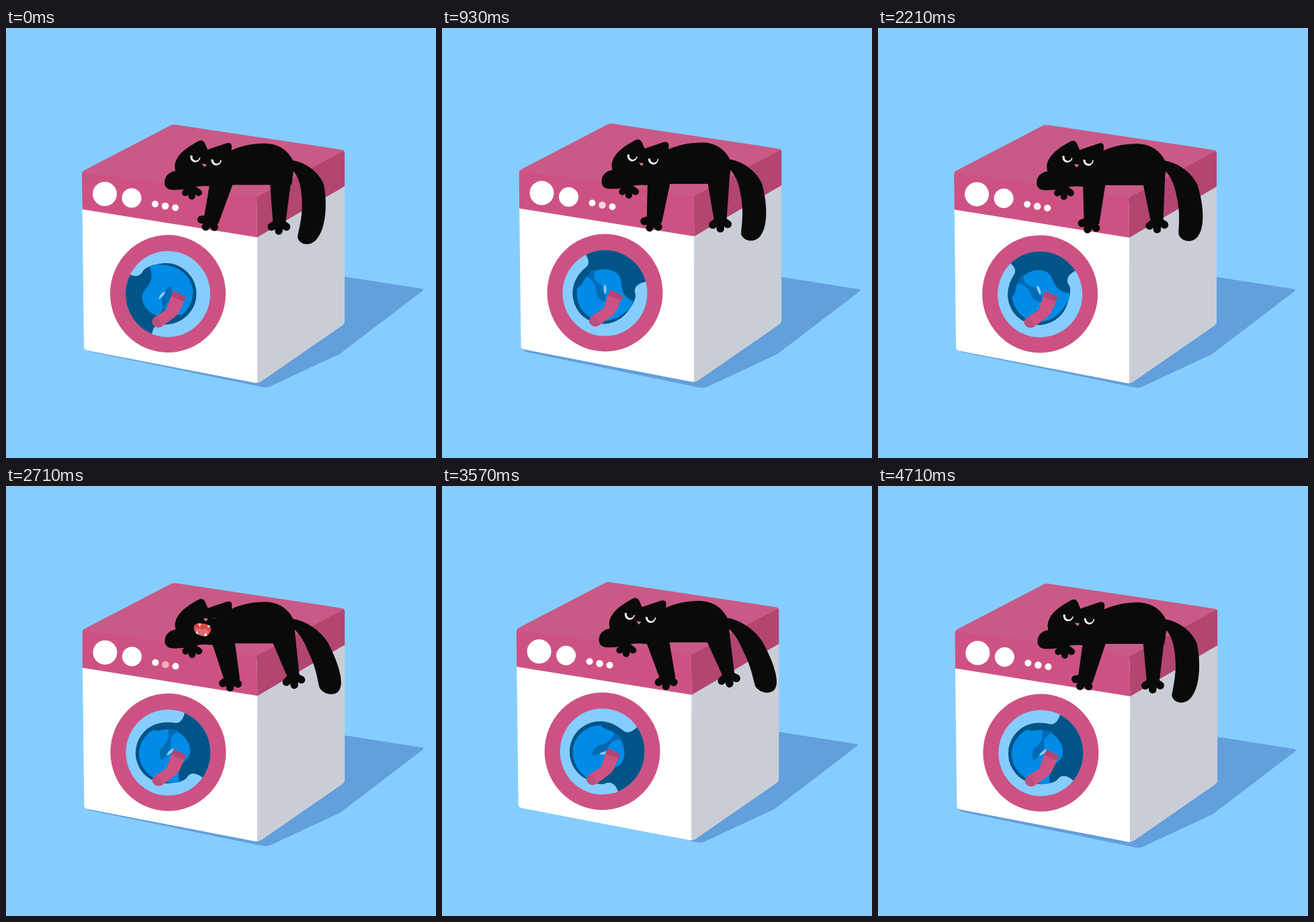
Recreate the animation shown at these times as an HTML page. Size 640x640 px, loop 4.78 s.

```html
<!DOCTYPE html>
<html lang="en">
<head>
<meta charset="utf-8">
<title>Cat on a washing machine</title>
<style>
  html, body { margin: 0; width: 100%; height: 100%; overflow: hidden; background: #85cdff; }
  svg { display: block; width: 100%; height: 100%; }
</style>
</head>
<body>
<svg viewBox="0 0 640 640">
  <defs>
    <clipPath id="box">
      <path d="M113 218Q113 213 118 211L243 146Q247 143 253 144L500 181Q504 182 504 187V436Q504 440 500 443L380 526Q375 529 370 528L121 480Q116 479 116 474Z"/>
    </clipPath>
    <clipPath id="glass"><ellipse cx="241" cy="396" rx="63" ry="64"/></clipPath>
    <g id="eye">
      <path d="M-7.7 0A7.7 8.6 0 0 0 7.7 0Z" fill="#fff"/>
      <circle cx=".8" cy=".6" r="5.3" fill="#0a0a0a"/>
    </g>
    <path id="paw" d="M-11.5 8L0 0L-.5 14M0 0L11 8" fill="none" stroke="#0a0a0a" stroke-width="11.500" stroke-linecap="round" stroke-linejoin="round"/>
  </defs>

  <rect width="640" height="640" fill="#85cdff"/>
  <path id="shadow" fill="#629fdc" d="M118 478L300 340L504 370L619 388Q623 389.500 619 392L497 485L396 532Q390 536 382 534.500L124 481.500Z"/>

  <g id="machine">
    <g clip-path="url(#box)">
      <path fill="#fff" d="M100 260H374V540H100Z"/>
      <path fill="#c9ced6" d="M374 305L520 220V450L374 535Z"/>
      <path fill="#c95a87" d="M108 212L248 138L510 183L373 254Z"/>
      <path fill="#cd5283" d="M108 212L373 252L374 311.500L108 269Z"/>
      <path fill="#b34571" d="M373 252L510 179V232L374 311.500Z"/>
    </g>
    <g fill="#fff">
      <circle cx="147" cy="247" r="18"/>
      <circle cx="187" cy="253" r="14.500"/>
      <circle cx="222" cy="262" r="5"/>
      <circle id="lamp" cx="237" cy="265" r="5.300"/>
      <circle cx="252" cy="267.500" r="5"/>
    </g>

    <ellipse cx="241" cy="395.500" rx="86" ry="87.500" fill="#cd5283"/>
    <g clip-path="url(#glass)">
      <rect x="170" y="325" width="142" height="142" fill="#85cdff"/>
      <g id="drum">
        <path fill="#005487" d="M34 -66C30 -46 23 -42 17 -43C9 -45 3 -45 -1 -45A45 45 0 0 0 1 46C15 46 25 44 29 38C35 31 45 33 56 46H85V-66Z"/>
        <path fill="#008be6" d="M-17 -35C-9 -31 1 -36 7 -34C21 -32 36 -18 36 -2C36 8 29 12 23 18C15 26 15 36 17 44L5 46C-3 43 -13 42 -21 36C-33 29 -41 14 -40.500 0C-40 -14 -31 -28 -17 -35Z"/>
        <path fill="#006ab3" d="M5 -34Q21 -34 20 -30C9 -26 6 -18 8 -10C7 0 -3 8 -8 11C-13 -1 -7 -8 -1 -12C5 -18 7 -26 5 -34Z"/>
        <path fill="#85cdff" d="M0 4Q3 -3 12 -6Q11 0 4 3Z"/>
      </g>
    </g>
    <path fill="#cd5283" d="M246 398L265 407L257 424Q254 428 250 431L231 445Q222 448 218 440Q216 434 222 430L239 419Z"/>
    <path fill="#b34571" d="M249.500 391L268 400L264.500 407L245.500 399Z"/>
    <path fill="#b9507c" d="M222 430Q231 433 232 444Q222 448 218 440Q216 434 222 430Z"/>

    <g fill="#0a0a0a">
      <path id="tail"/>
      <path id="hind"/>
      <use id="hindPaw" href="#paw"/>
      <g id="fore">
        <path d="M303 233L306 215H340L337 234L316 291Q303 298 294.500 283Z"/>
        <use href="#paw" transform="translate(304.500 284) rotate(30)"/>
      </g>
      <path d="M251 206C252 188 272 176 287 168Q294 165 297 174L300 181L328 171.500Q336 169 336 177L335.500 182C350 175 372 171 390 172C408 174 420 183 427 197L428 212L425 233.500H330Q308 237 296 235L284 236L262 240.500L250 241C242 241 236 238 236 230C236 220 243 214 252 213Z"/>
      <use href="#paw" transform="translate(277 238) scale(.88)"/>
    </g>
    <use id="eyeL" href="#eye"/>
    <use id="eyeR" href="#eye"/>
    <path id="lids" d="M275 190L290 193M304 194.500L320 196" fill="none" stroke="#fff" stroke-width=".8" stroke-dasharray="2 3" opacity=".7"/>
    <path id="nose" fill="#e0777f" d="M291.500 202L299 203L295.500 207Z"/>
    <g id="mouth">
      <path fill="#dc4846" d="M-13 -3Q-11 -11 -2 -9Q10 -10 13 -1Q12 9 3 10Q-12 9 -13 -3Z"/>
      <path fill="#dc6c78" d="M-12 0Q-5 -4 0 0Q6 -3 9 2Q9 8 3 9Q-10 8 -12 0Z"/>
      <path fill="#fff" d="M-6 -9L-2 -9L-4 -4ZM8 -7L12 -5L8 -3ZM-10 5L-8 2L-6 7ZM2 10L5 5L7 9Z"/>
    </g>
  </g>
</svg>
<script>
const LOOP = 4780, FRAMES = 67, STEP = LOOP / FRAMES;
const $ = id => document.getElementById(id);
const set = (id, name, value) => $(id).setAttribute(name, value);
const clamp = v => Math.max(0, Math.min(1, v));
const ease = v => v * v * (3 - 2 * v);
const sin = deg => Math.sin(deg * Math.PI / 180);
const wave = turns => .5 - .5 * Math.cos(turns * Math.PI * 2);

// Moves the points of a hanging path sideways, more the lower they hang.
const bend = (d, top, length, dx, dy) => d.replace(/(\d+) (\d+)/g, (_, x, y) => {
  const w = clamp((y - top) / length) ** 1.4;
  return `${+x + dx * w} ${+y + dy * w}`;
});

const TAIL = "M427 197C445 200 465 213 473 233C479 265 475 298 464 312"
  + "C456 325 438 325 434 312C434 305 443 280 440 250C439 230 432 215 424 210Z";
const HIND = "M393 230L397 287L406 297L416 290L428 200Z";

// One turn and a half, then a small swing past the end and back.
function drumAngle(n) {
  return 170 + 550 * ease(clamp(n / 40)) + 28 * sin(180 * clamp((n - 38) / 28));
}

function drawLimbs(s) {
  set("tail", "d", bend(TAIL, 205, 117, 40 * s, -14 * s));
  set("hind", "d", bend(HIND, 215, 73, 22 * s, -7 * s));
  set("hindPaw", "transform", `translate(${406.5 + 22 * s} ${288 - 7 * s}) rotate(${-10 * s})`);
  set("fore", "transform", `rotate(${-30 * s} 322 225)`);
}

function drawFace(n) {
  const yawn = clamp(Math.min(n - 33, 44 - n) / 3);
  const blink = clamp(2 - Math.abs(n - 58));
  const open = 1 - Math.max(clamp(yawn * 2), blink);
  set("eyeL", "transform", `translate(282 191.300) rotate(13) scale(1 ${open})`);
  set("eyeR", "transform", `translate(313 196) rotate(3) scale(1 ${open})`);
  set("lids", "visibility", blink === 1 ? "visible" : "hidden");
  set("nose", "transform", `translate(${1.5 * yawn} ${-6 * yawn})`);
  set("mouth", "transform", `translate(292 ${207 + 6 * yawn}) scale(${yawn})`);
}

function draw(n) {
  const x = -2.4 * sin(52.35 * n), y = 1.5 * sin(105 * n);
  const glow = wave(4 * n / FRAMES + .03);

  set("machine", "transform", `translate(${x} ${y})`);
  set("shadow", "transform", `translate(${x} ${y + 1.4 * x})`);
  set("drum", "transform", `translate(238 396) rotate(${drumAngle(n)})`);
  set("lamp", "fill", `rgb(${255 - 16 * glow},${255 - 128 * glow},${255 - 121 * glow})`);
  drawLimbs(wave(6 * n / FRAMES + .012));
  drawFace(n);
}

let start, shown = 0;
function tick(now) {
  start ??= now;
  const n = Math.floor(((now - start) % LOOP + 4) / STEP) % FRAMES;
  if (n !== shown) draw(shown = n);
  requestAnimationFrame(tick);
}
draw(0);
requestAnimationFrame(tick);
</script>
</body>
</html>
```
